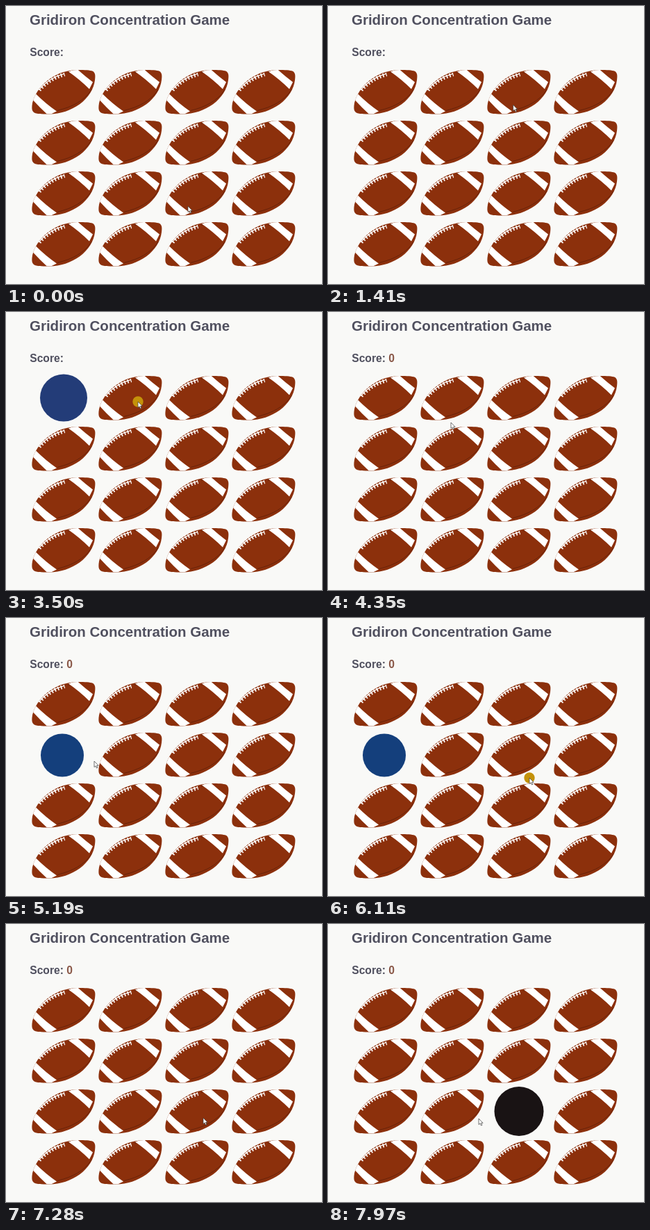
Animation of 455x400 px, one loop 8 s. Source, as an HTML page:

```html
<!DOCTYPE html>
<html lang="en">
<head>
<meta charset="utf-8">
<title>Gridiron Concentration Game</title>
<style>
  html, body { margin: 0; width: 100%; height: 100%; overflow: hidden; background: #f9f9f7; }
  svg { display: block; width: 455px; height: 400px; }
  text { font-family: "Liberation Sans", Arial, sans-serif; font-weight: 700; fill: #50505f; }
</style>
</head>
<body>
<svg viewBox="0 0 455 400">
  <defs>
    <path id="skin" d="M.5 52C3 30 28 1 66 .6C78 .4 86 1 89 3C92 6 91.6 10 91 15C88 42 58 64 25 64C14 64 5 64 2.5 61C.3 59 .2 56 .5 52Z"/>
    <clipPath id="edge"><use href="#skin"/></clipPath>
    <g id="ball">
      <use href="#skin" fill="#8c300c"/>
      <g clip-path="url(#edge)" fill="none">
        <path d="M86 29C76 45 58 54 37 59M52 5Q59 2 66 6" stroke="#64210a" stroke-width=".9"/>
        <path d="M53 3L65 -1Q77 10 88 18L83 28Q69 14 53 3ZM1 43L5 34Q20 49 36 60L24 66Q13 56 1 43Z" fill="#fff"/>
        <path d="M10 29.5Q25 12 47 6" stroke="#fff" stroke-width="1.3"/>
        <path d="M11 29.5Q25.5 13 47.5 7" stroke="#fff" stroke-width="5.4" stroke-dasharray="1.7 3"/>
      </g>
    </g>
  </defs>
  <rect width="455" height="400" fill="#f9f9f7"/>
  <text x="34" y="27" font-size="20.5">Gridiron Concentration Game</text>
  <text x="34.3" y="72" font-size="15.6">Score: <tspan id="score" fill="#8a5848">0</tspan></text>
  <g id="board"></g>
  <circle id="dot" r="7.7" fill="#c4920a"/>
  <path id="arrow" d="M0 0V8.6L2 6.8L3.4 10L4.9 9.4L3.5 6.3H6.1Z" fill="#fff" stroke="#3c3c3c" stroke-width=".7"/>
</svg>
<script>
const LOOP = 8000, START = 640, TICK = 77.1;
const $ = id => document.getElementById(id);

// first tick, last tick, end x, end y
const moves = [
  [0, 1, 262, 254], [2, 3, 366, 178], [4, 4, 422, 172],
  [8, 8, 417, 151], [9, 13, 41, 129], [14, 15, 70, 128],
  [31, 35, 190, 129], [43, 45, 178, 155], [48, 48, 177, 159],
  [49, 50, 63, 199], [52, 53, 81, 200], [57, 59, 127, 206],
  [60, 62, 178, 208], [67, 70, 290, 230], [75, 78, 294, 226],
  [79, 79, 291, 236], [84, 86, 284, 279], [92, 95, 217, 280]
];
const clicks = [[28, 29], [37, 37], [53, 54], [71, 72], [89, 90]];
const away = [5, 7];
const scoreTick = 43;

const faces = [
  { card: 0, from: 30, to: 42, x: 83, y: 123.5, r: 34, fill: "#233c78" },
  { card: 1, from: 38, to: 42, x: 179, y: 123.5, r: 34, fill: "#2b3a55" },
  { card: 4, from: 55, to: 78, x: 81, y: 197.5, r: 31, fill: "#143f7c" },
  { card: 6, from: 73, to: 78, x: 275, y: 196.5, r: 35, fill: "#d8a930" },
  { card: 10, from: 91, to: 99, x: 275, y: 269.5, r: 35.5, fill: "#191314" }
];

function add(tag, attrs) {
  const el = document.createElementNS("http://www.w3.org/2000/svg", tag);
  for (const k in attrs) el.setAttribute(k, attrs[k]);
  return $("board").appendChild(el);
}

const balls = Array.from({ length: 16 }, (_, i) =>
  add("use", { href: "#ball", x: 37 + i % 4 * 96, y: 91.4 + Math.floor(i / 4) * 73 }));
for (const f of faces) f.el = add("circle", { cx: f.x, cy: f.y, r: f.r, fill: f.fill });

const within = (n, [a, b]) => n >= a && n <= b;
const show = (el, on) => el.setAttribute("visibility", on ? "visible" : "hidden");

function cursorAt(n) {
  let x = 262, y = 288;
  for (const [a, b, ex, ey] of moves) {
    if (n < a) break;
    const p = Math.min(1, (n - a + 1) / (b - a + 1));
    x += (ex - x) * p;
    y += (ey - y) * p;
  }
  return `translate(${x} ${y})`;
}

function draw() {
  const n = Math.floor((performance.now() % LOOP - START) / TICK + 0.08);
  const place = cursorAt(n);
  $("arrow").setAttribute("transform", place);
  $("dot").setAttribute("transform", place);
  show($("arrow"), !within(n, away));
  show($("dot"), clicks.some(c => within(n, c)));
  show($("score"), n >= scoreTick);
  for (const f of faces) {
    const open = within(n, [f.from, f.to]);
    show(f.el, open);
    show(balls[f.card], !open);
  }
  requestAnimationFrame(draw);
}
draw();
</script>
</body>
</html>
```
